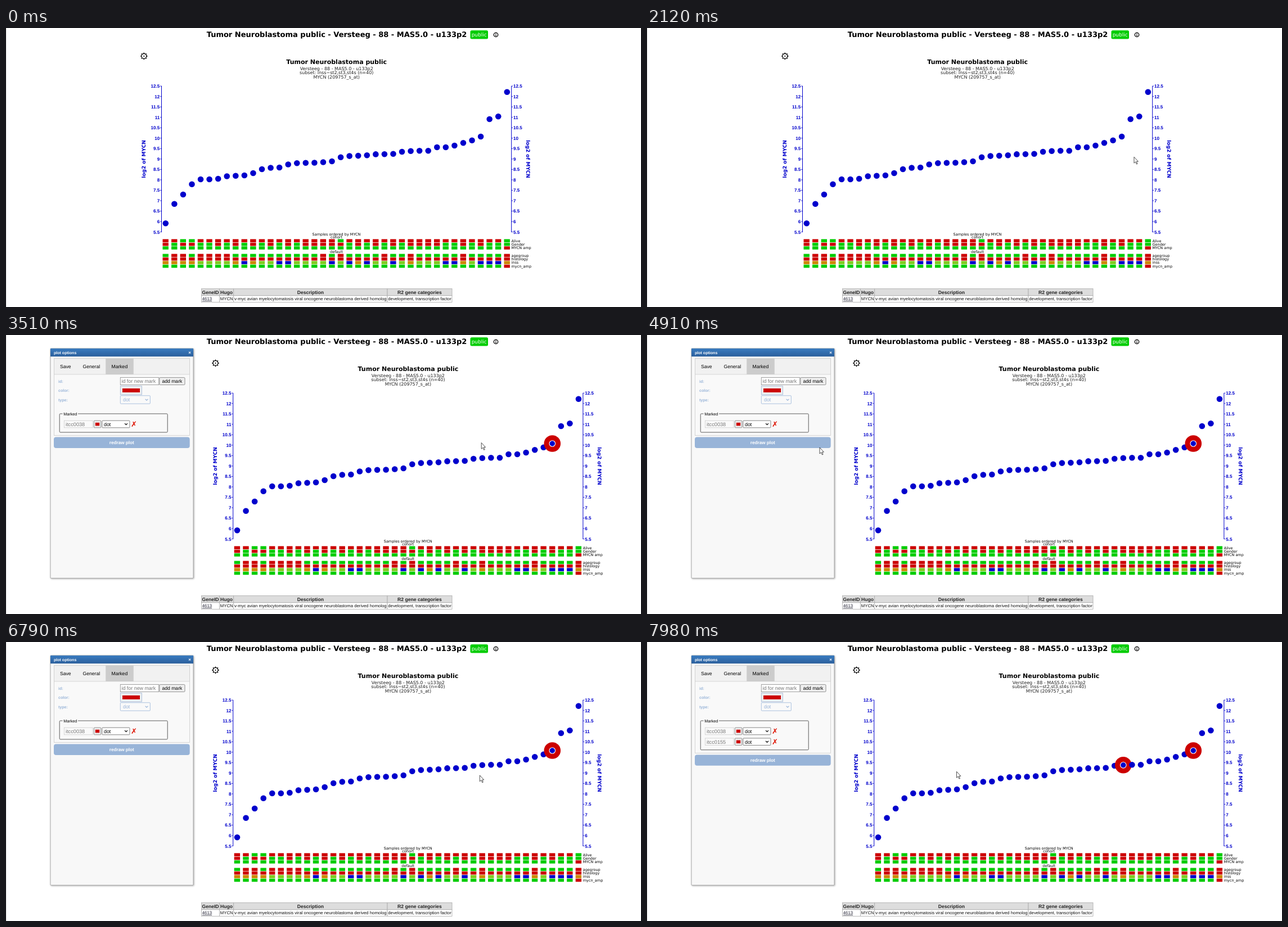
Write an HTML page that moves like this. It is 1129 px wide and 496 px high and loops after 8000 ms.

```html
<!DOCTYPE html>
<html lang="en">
<head>
<meta charset="utf-8">
<title>Gene expression plot</title>
<style>
  html, body { margin: 0; width: 100%; height: 100%; overflow: hidden; background: #fff; }
  svg { display: block; width: 1129px; height: 496px; text-rendering: geometricPrecision; }
  text { font-family: "Liberation Sans", Arial, sans-serif; white-space: pre; }
  .wide { font-family: "DejaVu Sans", Verdana, sans-serif; }
  .b { font-weight: bold; }
  .u { text-decoration: underline; }
  .mid { text-anchor: middle; }
  .end { text-anchor: end; }
  .shadow { filter: drop-shadow(1px 1px 1.5px #0005); }
</style>
</head>
<body>
<svg id="stage" viewBox="0 0 1129 496">
  <defs>
    <linearGradient id="bar" x2="0" y2="1">
      <stop stop-color="#3a7cc0"/><stop offset="1" stop-color="#2b5f9c"/>
    </linearGradient>
  </defs>
</svg>
<script>
const stage = document.getElementById('stage');
const LOOP = 8000, SHIFT = 127.2, STEP = 15.564;
const BLUE = '#0000cc', RED = '#cc0000', GREEN = '#00cc00', PALE = '#98b4d8';

// y is the vertical middle of the capitals
const text = (x, y, size, str, cls = '', fill = '#000', more = '') =>
  `<text x="${x}" y="${y + size * 0.36}" font-size="${size}" class="${cls}" fill="${fill}" ${more}>${str}</text>`;
const rect = (x, y, w, h, fill, stroke = 'none', r = 0) =>
  `<rect x="${x}" y="${y}" width="${w}" height="${h}" rx="${r}" fill="${fill}" stroke="${stroke}" stroke-width=".8"/>`;
const circle = (x, y, r, fill, more = '') => `<circle cx="${x}" cy="${y}" r="${r}" fill="${fill}" ${more}/>`;
const path = (d, stroke, width = 1, fill = 'none') =>
  `<path d="${d}" stroke="${stroke}" stroke-width="${width}" fill="${fill}"/>`;
const chevron = (x, y, color) => path(`M${x - 2.4} ${y - 1.2}l2.4 2.4l2.4 -2.4`, color, 1.2);

function add(markup) {
  const g = document.createElementNS('http://www.w3.org/2000/svg', 'g');
  g.innerHTML = markup;
  return stage.appendChild(g);
}
const show = (g, on) => g.style.display = on ? '' : 'none';
const move = (g, x, y) => g.setAttribute('transform', `translate(${x} ${y})`);

const dotY = [347.3, 312.8, 296, 277.8, 269, 269, 268, 263.5, 262.7, 262, 258, 251, 248.5, 248,
  242.5, 240.3, 239.7, 239.5, 238.5, 237, 229.8, 227.6, 227.1, 226.3, 224.4, 224.2, 223.8, 220,
  218.8, 218.2, 218.2, 212, 212, 209, 204.3, 199.8, 193, 162, 157.3, 113.8];
const MARKED = [36, 28];
const dotX = i => 283.8 + STEP * i;
const dot = (i, more) => circle(dotX(i), dotY[i], 5.3, BLUE, more);
const mark = i => `<g id="mark${i}">${circle(dotX(i), dotY[i], 14.8, RED)}${dot(i, 'stroke="#fff" stroke-width="1.1"')}</g>`;

function header() {
  const info = circle(871, 12, 3.7, 'none', 'stroke="#000" stroke-width="1.3"') + path('M871 11.4v2.8M871 9.6v1', '#000', 1.4);
  return path('M.5 0V496', '#ddd') +
    text(356.7, 11, 13, 'Tumor Neuroblastoma public - Versteeg - 88 - MAS5.0 - u133p2', 'wide b') +
    rect(825.5, 4.2, 31.5, 15.2, GREEN, 'none', 2.5) +
    text(841.2, 12, 9, 'public', 'wide mid', '#fff') + info;
}

function table() {
  const edges = [347.5, 379.5, 404.7, 678, 793];
  const heads = ['GeneID', 'Hugo', 'Description', 'R2 gene categories'];
  const cells = ['4613', 'MYCN', 'v-myc avian myelocytomatosis viral oncogene neuroblastoma derived homolog',
    'development, transcription factor'];
  return heads.map((head, i) => {
    const x = edges[i], w = edges[i + 1] - x;
    return rect(x, 463.5, w, 12.3, '#ddd', '#aaa') + rect(x, 475.8, w, 11.7, '#fff', '#aaa') +
      text(x + w / 2, 469.8, 8.6, head, 'b mid', '#222') +
      text(x + 1.3, 481.3, 7.75, cells[i], i ? '' : 'u', i ? '#111' : '#223');
  }).join('');
}

function axes() {
  let out = path('M276.5 103V363M898.7 103V363', BLUE);
  for (let i = 0; i < 15; i++) {
    const y = 103.2 + i * 18.53, label = 12.5 - i / 2;
    out += path(`M274 ${y}h2.5M898.7 ${y}h2.5`, BLUE, 0.8) +
      text(273.3, y, 8.1, label, 'b end', BLUE) + text(902, y, 8.1, label, 'b', BLUE);
  }
  const title = (x, angle) =>
    text(0, 0, 9, 'log2 of MYCN', 'wide b mid', BLUE, `transform="translate(${x} 233) rotate(${angle})"`);
  return out + title(244.5, -90) + title(928.5, 90);
}

function tracks() {
  const colors = { R: RED, G: GREEN, O: '#cc8800', L: '#80cc22', B: BLUE };
  const amplified = 'G'.repeat(39) + 'R';
  const rows = [
    [378.2, 'Alive', 'RRGG' + 'R'.repeat(16) + 'G' + 'R'.repeat(18) + 'G'],
    [384.6, 'Gender', 'RGRRGGRGRGRGRGRGRRRRRGRGRGRGRRRRGGRGRGGG'],
    [391, 'MYCN amp', amplified],
    [404.4, 'agegroup', 'GRRGRRRR' + 'G'.repeat(10) + 'RGRGGGGRGGRGGGGGRGGGGR'],
    [410.7, 'histology', 'R'.repeat(40)],
    [417.1, 'inss', 'OOOOLLLLOBOLLBBLLLLBLBOBLLBLOLLLBBOLBBBO'],
    [423.5, 'mycn_amp', amplified]
  ];
  return rows.map(([y, label, code]) =>
    [...code].map((c, i) => rect(dotX(i) - 5.3, y - 2.8, 10.4, 5.6, colors[c])).join('') +
    text(898.5, y, 6.5, label, 'wide')).join('');
}

function plot() {
  const teeth = [...Array(8).keys()].map(i =>
    `<path d="M245.3 45.6v-1.8" stroke="#000" stroke-width="1.7" transform="rotate(${i * 45} 245.3 50)"/>`).join('');
  return circle(245.3, 50, 4.4, 'none', 'stroke="#000" stroke-width="1.2"') + teeth + circle(245.3, 50, 1.1, '#000') +
    text(587.7, 59.6, 11, 'Tumor Neuroblastoma public', 'wide b mid') +
    text(587.7, 72, 8, 'Versteeg - 88 - MAS5.0 - u133p2', 'wide mid', '#222') +
    text(587.7, 79.6, 8, 'subset: inss~st2,st3,st4s (n=40)', 'wide mid', '#222') +
    text(587.7, 87.2, 8, 'MYCN (209757_s_at)', 'wide mid', '#222') + axes() + tracks() +
    text(587.5, 366.8, 6.5, 'Samples ordered by MYCN', 'wide mid') +
    text(587.5, 372, 6.5, 'cohort', 'wide mid') +
    text(587.5, 398, 6.5, 'default', 'wide mid') +
    dotY.map((_, i) => dot(i) + (MARKED.includes(i) ? mark(i) : '')).join('');
}

const markRow = (y, id) =>
  rect(103.5, y - 6.2, 50.5, 12.6, '#fafafa', '#ccc') + text(106, y + 0.3, 9.2, id, '', '#777') +
  rect(156.3, y - 6.2, 12.5, 12.6, '#efefef', '#777', 1) + rect(158.8, y - 2.6, 7.4, 5.6, RED) +
  rect(170.9, y - 6.2, 49, 12.6, '#fff', '#666', 1) + text(174, y + 0.2, 8.9, 'dot') + chevron(213.5, y, '#000') +
  text(227.5, y, 13, '✗', 'wide b mid', '#dd1100');

function panel(ids) {
  const extra = (ids.length - 1) * 18.8;
  return `<g class="shadow">${rect(79, 24, 254, 408.3, '#f8f8f8', '#999', 1)}</g>` +
    rect(79, 24, 254, 14.3, 'url(#bar)') + text(85, 31.2, 7.05, 'plot options', 'b', '#fff') +
    text(326.7, 31.4, 8, '×', 'b mid', '#fff') +
    rect(85.4, 41.8, 241, 136.8 + extra, '#f9f9f9', '#ccc') +
    rect(85.4, 41.8, 241, 28.2, '#f1f1f1', '#ccc') + rect(177.2, 42, 49.6, 28, '#ccc') +
    text(96, 56.2, 8.6, 'Save') + text(136.5, 56.2, 8.6, 'General') + text(187.5, 56.2, 8.6, 'Marked') +
    ['id:', 'color:', 'type:'].map((s, i) => text(93, 82.3 + i * 16.4, 7.05, s, 'b', PALE)).join('') +
    rect(203.3, 75.6, 68.5, 13, '#fff', '#888') + text(205.5, 82.2, 8.9, 'id for new mark', '', '#757575') +
    rect(272.8, 75.6, 45.2, 13, '#efefef', '#777', 1.5) + text(295.4, 82.2, 8.6, 'add mark', 'mid') +
    rect(203.3, 90.8, 38, 15.2, '#efefef', PALE) + rect(207, 95, 31, 7, RED) +
    rect(203.3, 107.8, 53, 14.4, '#f9f9f9', PALE, 1) + text(208, 115, 8.9, 'dot', '', PALE) + chevron(250, 115, PALE) +
    rect(95.2, 140, 192, 33 + extra, 'none', '#333', 1.5) + rect(100.5, 137, 27.5, 6, '#f9f9f9') +
    text(102.3, 140.2, 7.2, 'Marked') + ids.map((id, i) => markRow(158.4 + i * 18.8, id)).join('') +
    rect(85, 181.6 + extra, 241.7, 19.3, PALE, 'none', 4) +
    text(205.8, 191.2 + extra, 8.2, 'redraw plot', 'b mid', '#fff');
}

function tooltip(id, value, age, group, inss, label, wm, adrn) {
  const lines = [['Val transform_log2 of MYCN', value], [], ['cohort'], ['Alive', 'yes'], ['Gender', 'male'],
    ['Last contact state', 'no_evidence_disease'], ['MYCN amp', 'no'], ['default'], ['age_year', age],
    ['agegroup', group], ['gender', 'male'], ['histology', 'nb'], ['inss', inss], ['mycn_amp', 'no'],
    ['r2_label', label], ['recurrence_or_progression', 'no'], ['userdefined-main'], ['kaplanscan-mycn', 'low'],
    ['mycn', 'no'], ['nonameprovided', 'ND'], ['r2_imr32mycn_wm', wm], ['testforkaplan_r2_mesadrn_adrn', adrn]];
  return `<g class="shadow">${rect(0, 0, 146.5, 200.5, '#fafafa', '#aaa', 2)}</g>` +
    rect(0, 0, 146.5, 15, 'url(#bar)', 'none', 1) + text(6.5, 8, 7.05, id, 'b', '#fff') +
    lines.map(([key, val], i) => key ? text(6.5, 30.1 + i * 7.786, 7.05,
      `<tspan class="b${val ? '' : ' u'}">${key}:</tspan>${val ? ' ' + val : ''}`, '', '#111') : '').join('');
}

add(header() + table());
const plotGroup = add(plot());
const marks = MARKED.map(i => document.getElementById('mark' + i));
const panels = [['itcc0038'], ['itcc0038', 'itcc0155']].map(ids => add(panel(ids)));
const tips = [
  add(tooltip('itcc0038', '10.07', '0', '&lt;=1', 'st4s', 'n409t', '-0.19', '0.03')),
  add(tooltip('itcc0155', '9.38', '2', '&gt;1', 'st3', 'n552t', '-0.93', '0.04'))
];
const halo = add(circle(0.7, 1, 8.3, '#ffff00', 'opacity=".52"'));
const cursor = add(path('M0 0V11L2.6 8.7L4.4 12.9L6 12.2L4.3 8.1H7.4Z', '#222', 0.8, '#fff'));

// time, x, y of the pointer tip
const track = [[1240, 1088, 481], [1500, 911, 342], [1560, 922, 353], [1740, 922, 353], [2120, 866, 229.3],
  [2490, 847, 194], [2550, 845.2, 191.5], [4380, 845.2, 191.5], [4440, 846, 207], [4640, 846, 207],
  [4700, 847, 222], [4910, 307, 200], [5140, 307, 200], [5300, 303, 207], [5930, 171, 153], [5980, 169, 153],
  [6200, 330, 330], [6400, 540, 460], [6730, 829, 300], [6790, 842.3, 237], [7100, 846.5, 216.5],
  [7599, 846.5, 216.5], [7600, 851, 228], [7660, 851, 228], [7980, 550.5, 230.3], [LOOP, 550.5, 230.3]];

function pointer(t) {
  const i = Math.max(1, track.findIndex(k => k[0] > t));
  const [t0, x0, y0] = track[i - 1], [t1, x1, y1] = track[i];
  const u = (t - t0) / (t1 - t0);
  return [x0 + (x1 - x0) * u, y0 + (y1 - y0) * u];
}

function draw(t) {
  const within = (from, to = LOOP) => t >= from && t < to;
  const [x, y] = pointer(t);
  move(plotGroup, within(3510) ? SHIFT : 0, 0);
  show(marks[0], within(3510));
  show(marks[1], within(7660));
  show(panels[0], within(3510, 7660));
  show(panels[1], within(7660));
  show(tips[0], within(2550, 3510));
  show(tips[1], within(7100, 7660));
  tips.forEach(g => move(g, x - 143.7, y + 7.6));
  show(halo, within(3360, 3510) || within(7550, 7600));
  move(halo, x, y);
  show(cursor, within(1240));
  move(cursor, x, y);
}

const start = performance.now();
function frame() {
  draw((performance.now() - start) % LOOP);
  requestAnimationFrame(frame);
}
frame();
</script>
</body>
</html>
```
